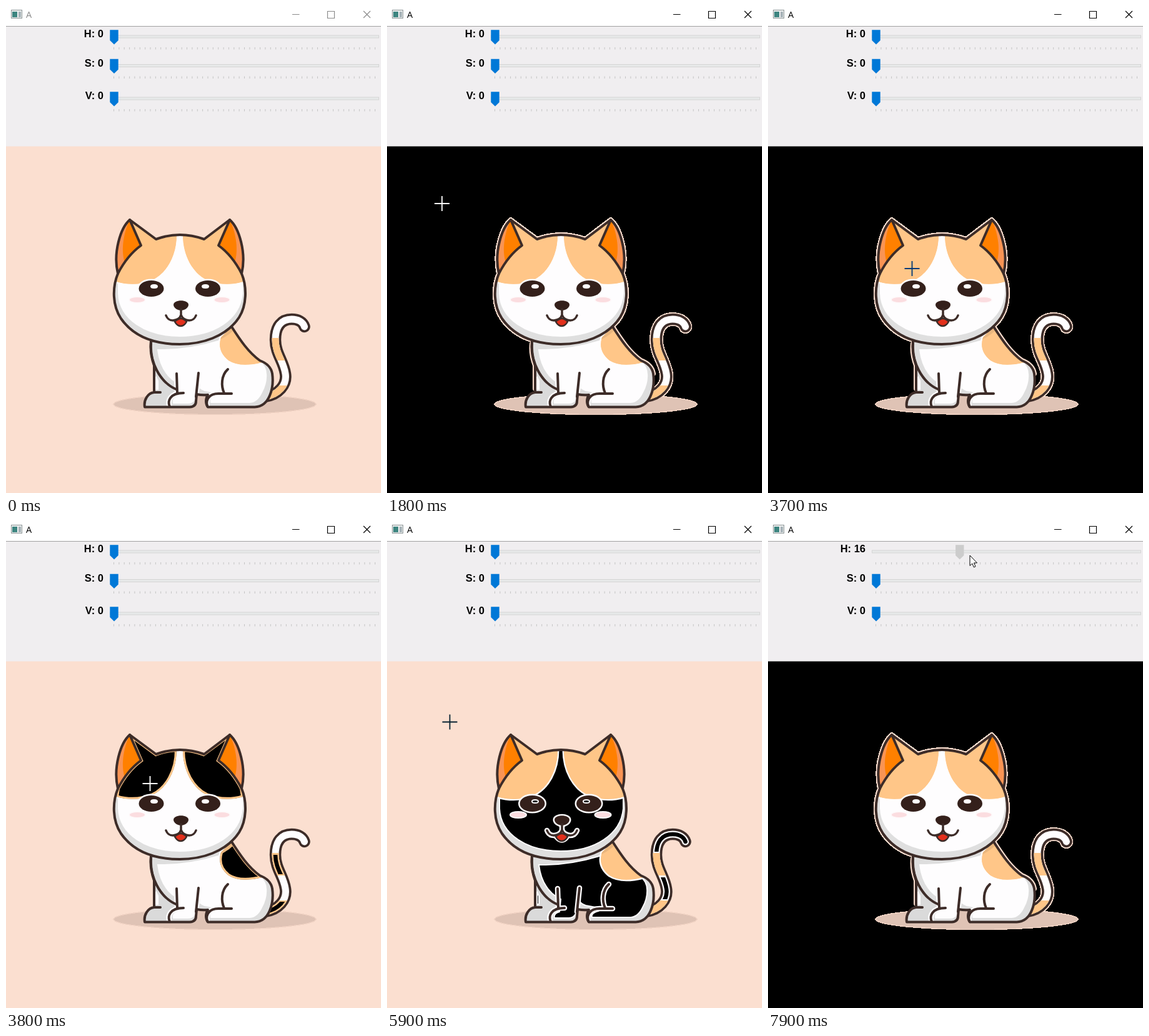
Animation, 600 px wide and 779 px high, one loop 8 s. Source, as an HTML page:

```html
<!DOCTYPE html>
<html lang="en">
<head>
<meta charset="utf-8">
<title>A</title>
<style>
html, body { margin: 0; width: 100%; height: 100%; overflow: hidden; background: #fff; }
svg { display: block; width: 100vw; height: 100vh;
  --bg: #fbdfd0; --white: #fefdfe; --tan: #ffc688; --title: #8a8a8a; }
.label { font: bold 16.5px "Liberation Sans", Arial, sans-serif; text-anchor: end; }
.title { font: 14.5px "Open Sans", sans-serif; fill: var(--title); }
.line { fill: none; stroke: #3d2c28; stroke-width: 4; stroke-linecap: round; stroke-linejoin: round; }
.fringe { fill: none; stroke: #fbdfd0; stroke-width: 8; stroke-linejoin: round; stroke-linecap: round; }
.white { fill: var(--white); stroke: #fefdfe; stroke-width: 2; }
.halo { fill: none; stroke: #fefdfe; stroke-width: 8.5; stroke-linecap: round; }
.tan { fill: var(--tan); stroke: #ffc688; stroke-width: 6; }
.dark { fill: #34201b; stroke: #fefdfe; stroke-width: 5; paint-order: stroke; }
.tail { fill: none; stroke-linecap: round; }
</style>
</head>
<body>
<svg viewBox="0 0 600 779" preserveAspectRatio="none">
  <defs>
    <path id="head" d="M198 342L240 373Q278 359 317 373L358 342C373 355 385 395 377 428C386 450 385 479 373 498C352 530 312 541 278 541C240 541 205 530 184 500C170 479 170 450 179 428C171 395 183 355 198 342Z"/>
    <path id="body" d="M232 536C230 555 234 567 237 575V618C227 619 220 630 222 641.500H294Q304 641 304 632L305 621Q314 623 323 622C319 628 319 636 323 641.500H398C422 641 429 610 426 588C424 576 414 570 406 567C388 554 375 535 361 513Z"/>
    <path id="tail" d="M414 625C436 622 450 606 447 588C444 568 431 556 431 534C431 512 441 501 457 501C467 501 475 505 477.500 513"/>
    <path id="mark" d="M198 342L240 373Q256 367 273 366C273 400 257 427 235 438Q207 450 177 441L179 428Q194 399 216 383Z"/>
    <path id="spot" d="M361 513C375 535 388 554 406 567L410 570Q375 579 356 567Q337 552 344 530Z"/>
    <path id="legs" d="M273 588L274 619M284 619C262 619 258 632 262 641M308 587L304 625M355 581C344 591 344 608 349 619M361 620H340C325 620 319 630 322 640"/>
    <path id="lips" d="M256 495Q259 503 267 503Q278 502 280 494Q283 502 293 503Q301 503 304 495M280 485V495"/>
    <clipPath id="inMark"><use href="#mark"/></clipPath>
    <clipPath id="inSpot"><use href="#spot"/></clipPath>
    <clipPath id="inBody"><use href="#body"/></clipPath>
    <clipPath id="inHead"><use href="#head"/></clipPath>
    <clipPath id="bands"><path d="M400 531H470V567H400ZM400 607H470V640H400Z"/></clipPath>
    <clipPath id="bandCores"><path d="M400 534H470V565H400ZM420 609H470V628H420Z"/></clipPath>
    <clipPath id="gaps"><path d="M400 480H500V529H400ZM400 570H470V605H400Z"/></clipPath>
    <g id="ear">
      <path fill="#f99454" d="M198 342C183 355 171 395 179 428Q194 399 216 383Z"/>
      <path fill="#ff8000" d="M198 342C187 365 184 392 190 410Q200 395 216 383Z"/>
    </g>
  </defs>

  <rect y="224" width="600" height="555" fill="var(--bg)"/>

  <g shape-rendering="crispEdges">
    <ellipse cx="334" cy="637" rx="162" ry="16.500" fill="#dfc3b5" stroke="#f0d2c3" stroke-width="1.500"/>
    <use href="#head" class="fringe"/>
    <use href="#tail" class="fringe" style="stroke-width:22"/>
  </g>
  <path class="fringe" d="M232 540C230 555 234 567 237 575V612M361 513C375 535 388 554 406 567C414 570 424 576 426 588"/>
  <ellipse cx="334" cy="637" rx="160" ry="15.500" fill="#dfc3b5"/>

  <g class="tail">
    <use href="#tail" stroke="#3d2c28" stroke-width="18.500"/>
    <use href="#tail" stroke="#fefdfe" stroke-width="11"/>
    <g clip-path="url(#gaps)"><use href="#tail" stroke="var(--white)" stroke-width="6.500"/></g>
    <g clip-path="url(#bands)"><use href="#tail" stroke="#ffc688" stroke-width="11"/></g>
    <g clip-path="url(#bandCores)"><use href="#tail" stroke="var(--tan)" stroke-width="6.500"/></g>
  </g>

  <use href="#body" fill="#dedede"/>
  <g clip-path="url(#inBody)">
    <path class="white" d="M243 550Q290 551 340 536L361 518C376 540 390 558 406 570C419 577 419 600 409 618Q402 633 390 634H328Q326 627 338 624L345 620L318 615Q310 612 306 606L302 628Q299 635 291 635H268Q266 628 276 625L278 605Q248 590 243 550Z"/>
    <path fill="#dadada" d="M234 570Q245 600 272 613V619Q258 625 261 642H222C220 630 227 619 237 618Z"/>
    <path class="white" d="M240 593L243 600V613H240Z"/>
    <use href="#legs" class="halo"/>
    <use href="#spot" class="halo" style="stroke-width:5"/>
  </g>
  <g clip-path="url(#inSpot)">
    <use href="#spot" class="tan"/>
    <use href="#head" fill="none" stroke="#e9b67e" stroke-width="14"/>
  </g>
  <g class="line">
    <use href="#legs"/>
    <path d="M232 540C230 568 245 601 272 613M237 618H247"/>
    <use href="#body"/>
  </g>

  <use href="#head" fill="#dfdfdf"/>
  <g clip-path="url(#inHead)">
    <path class="white" d="M278 364L180 430V460C182 502 225 528 278 528C332 528 374 502 378 460V430Z"/>
    <use href="#mark" class="halo" style="stroke-width:5"/>
    <use href="#mark" class="halo" style="stroke-width:5" transform="matrix(-1 0 0 1 556 0)"/>
  </g>
  <g id="half">
    <use href="#ear"/>
    <g clip-path="url(#inMark)"><use href="#mark" class="tan"/></g>
    <path class="line" d="M198 342L216 383Q194 399 179 428"/>
  </g>
  <use href="#half" transform="matrix(-1 0 0 1 556 0)"/>
  <use href="#head" class="line"/>

  <g fill="#fbdde0" stroke="#fefafb" stroke-width="4" paint-order="stroke">
    <ellipse cx="210" cy="470" rx="12" ry="4"/>
    <ellipse cx="345.500" cy="470" rx="12" ry="4"/>
  </g>
  <ellipse class="dark" cx="232.500" cy="452" rx="20" ry="13"/>
  <ellipse class="dark" cx="323" cy="452" rx="20" ry="13"/>
  <g class="white">
    <ellipse cx="237" cy="448.500" rx="5" ry="2.500"/>
    <ellipse cx="319" cy="448.500" rx="5" ry="2.500"/>
  </g>
  <use href="#lips" class="halo"/>
  <path class="halo" d="M271 505Q280 516 288 505"/>
  <path class="dark" d="M268 478C268 469 292 469 292 478C292 483 285 487 280 487C275 487 268 483 268 478Z"/>
  <path fill="#e3301c" stroke="#3d2c28" stroke-width="2.500" d="M270 505Q280 495 289 505Q285 512 279.500 512Q274 512 270 505Z"/>
  <use href="#lips" class="line" style="stroke-width:3.500"/>

  <rect width="600" height="33" fill="#fff"/>
  <rect y="33" width="600" height="191.500" fill="#f0eef0"/>
  <path d="M0 32.500H600" stroke="#a0a0a0"/>
  <rect x="8.500" y="6.500" width="17" height="13" fill="#eef0f0" stroke="#8b9495"/>
  <rect x="10" y="9" width="8" height="9" fill="#3d8580"/>
  <rect x="20" y="9" width="4" height="9" fill="#a6b2b8"/>
  <text class="title" x="32" y="18.500">A</text>
  <path fill="none" stroke="var(--title)" stroke-width="1.200" d="M458 13.500H469.500M514.500 8.500H525.500V19.500H514.500ZM572 8L583 19M583 8L572 19"/>
  <g id="sliders"></g>

  <path id="cross" d="M-12 0H12M0 -12V12" fill="none" stroke="#fff" stroke-width="1.800" style="mix-blend-mode:difference"/>
  <path id="arrow" d="M0 0V16.500L3.800 13L6.400 19L9 17.800L6.500 12H11.500Z" fill="#fff" stroke="#000"/>
</svg>
<script>
const LOOP = 8000, STEP = 100, TICK = 8.36;
const $ = id => document.getElementById(id);
const svg = document.querySelector('svg');

const ticks = Array.from({ length: 51 }, (_, i) => `M${(172.5 + i * TICK).toFixed(1)} 17v3.500`).join('');
$('sliders').innerHTML = [['H', 49], ['S', 95.5], ['V', 148]].map(([name, y]) => `
  <text class="label" id="text${name}" x="156" y="${y + 1.2}">${name}: 0</text>
  <g transform="translate(0 ${y})">
    <rect x="166.500" y="-2" width="430" height="4" fill="#e7e9e9" stroke="#d5d5d5"/>
    <path d="${ticks}" stroke="#c3c3c3"/>
    <path id="thumb${name}" d="M-6.700 -10.700H6.700V6L0 12.500L-6.700 6Z" fill="#0078d7" transform="translate(173)"/>
  </g>`).join('');

// pointer track: time, x, y
const track = [
  [300, 588, 55], [600, 420, 170], [900, 215, 300], [1100, 115, 347], [1400, 88, 316],
  [1900, 88, 316], [2000, 270, 416], [2100, 416, 404], [2200, 416, 404],
  [2500, 300, 190], [2600, 240, 122], [2800, 83, 230], [3100, 180, 390],
  [3400, 230.5, 420], [3700, 230.5, 420], [3900, 230.5, 420], [4200, 293, 470], [4500, 265, 520], [4800, 224, 485],
  [5300, 224, 485], [5600, 26, 370], [5900, 100.5, 321.5],
  [6400, 100.5, 321.5], [6800, 160, 90], [7000, 171, 46],
  [7200, 171, 46], [7500, 235, 74], [7900, 323, 55]
];

// the colour picked by a click turns black
const clicks = [[0, ''], [1800, 'bg'], [3800, 'tan'], [5100, 'white'], [6200, 'bg']];
const colors = { bg: '#fbdfd0', white: '#fefdfe', tan: '#ffc688' };

function pointer(t) {
  const i = track.findIndex(k => k[0] > t);
  if (i < 0) return track[track.length - 1].slice(1);
  const [t0, x0, y0] = track[i - 1], [t1, x1, y1] = track[i];
  const p = (t - t0) / (t1 - t0);
  return [x0 + (x1 - x0) * p, y0 + (y1 - y0) * p];
}

function show(el, on, x, y) {
  el.style.display = on ? '' : 'none';
  if (on) el.setAttribute('transform', `translate(${x} ${y})`);
}

function draw(time) {
  const t = Math.floor(time % LOOP / STEP) * STEP;

  const picked = clicks.filter(c => c[0] <= t).pop()[1];
  for (const key in colors) svg.style.setProperty('--' + key, key === picked ? '#000' : colors[key]);
  svg.style.setProperty('--title', t < 1800 ? '#8a8a8a' : '#000');

  const hue = Math.round(16 * Math.min(1, Math.max(0, (t - 7200) / 700)));
  $('textH').textContent = 'H: ' + hue;
  $('thumbH').setAttribute('transform', `translate(${173 + hue * TICK})`);
  $('thumbH').setAttribute('fill', t >= 7300 ? '#cccccc' : '#0078d7');

  const visible = t >= track[0][0];
  const [x, y] = visible ? pointer(t) : [0, 0];
  show($('cross'), visible && y >= 224, x, y);
  show($('arrow'), visible && y < 224, x, y);
}

const start = performance.now();
function loop() {
  draw(performance.now() - start);
  requestAnimationFrame(loop);
}
loop();
</script>
</body>
</html>
```
